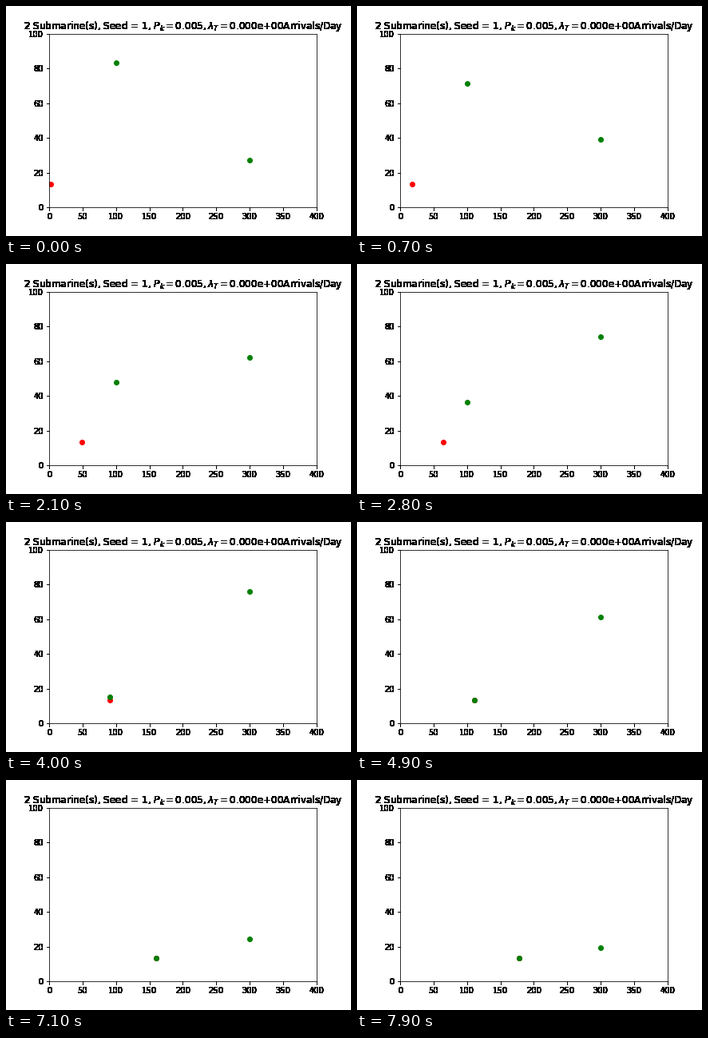
A matplotlib script for the animation above (8 s loop, 432 by 288 pixels).

```python
import random

import matplotlib.pyplot as plt
import numpy as np
from matplotlib.animation import FuncAnimation

FRAMES = 80
TARGET_STEP = 2.228        # distance per frame
PATROL_STEP = 1.671
CHASE_STEP = 2.45
DETECT_RANGE = 28
LOW, HIGH = 15, 85         # patrol limits

random.seed(1)
TARGET_Y = 100 * random.random()


def harden(img, dpi):
    """Turn every touched pixel solid black."""
    out = np.zeros_like(img)
    out[..., 3] = img[..., 3] > 0
    return out, 0, 0


def bounce(y):
    span = HIGH - LOW
    return LOW + span - abs((y - LOW) % (2 * span) - span)


def target(n):
    return np.array([TARGET_STEP * (n + 1), TARGET_Y])


def sub_track(x):
    """Patrol up and down at x, then chase the target once it is in range."""
    start = 100 * random.random()
    heading = -1 if random.random() > 0.5 else 1
    pos, chasing, track = np.array([x, start]), False, []
    for n in range(FRAMES):
        gap = target(n) - pos
        dist = np.hypot(*gap)
        chasing = chasing or dist < DETECT_RANGE
        if chasing:
            pos = pos + gap * min(1, CHASE_STEP / max(dist, 1e-9))
        else:
            pos = np.array([x, bounce(start + heading * PATROL_STEP * (n + 1))])
        track.append(pos)
    return track


tracks = [[target(n) for n in range(FRAMES)], sub_track(100.0), sub_track(300.0)]

plt.rcParams.update({"font.family": "DejaVu Sans", "font.size": 10})
fig, ax = plt.subplots(figsize=(6, 4), dpi=72)
fig.subplots_adjust(left=0.125, right=0.9, bottom=0.125, top=0.88)
ax.set(xlim=(0, 400), ylim=(0, 100),
       xticks=range(0, 401, 50), yticks=range(0, 101, 20))
title = ax.set_title(r"2 Submarine(s), Seed = 1, $P_k = 0.005, \lambda_T = $"
                     "0.000e+00Arrivals/Day")

title.set_agg_filter(harden)
for axis in (ax.xaxis, ax.yaxis):
    for tick in axis.get_major_ticks():
        tick.label1.set_agg_filter(harden)
        tick.tick1line.set_agg_filter(harden)

dots = [ax.plot([], [], "o", color=c)[0] for c in ("red", "green", "green")]


def update(n):
    for dot, track in zip(dots, tracks):
        x, y = track[n]
        dot.set_data([x], [y])
    return dots


anim = FuncAnimation(fig, update, frames=FRAMES, interval=100,
                     repeat=True, repeat_delay=0)
plt.show()
```
